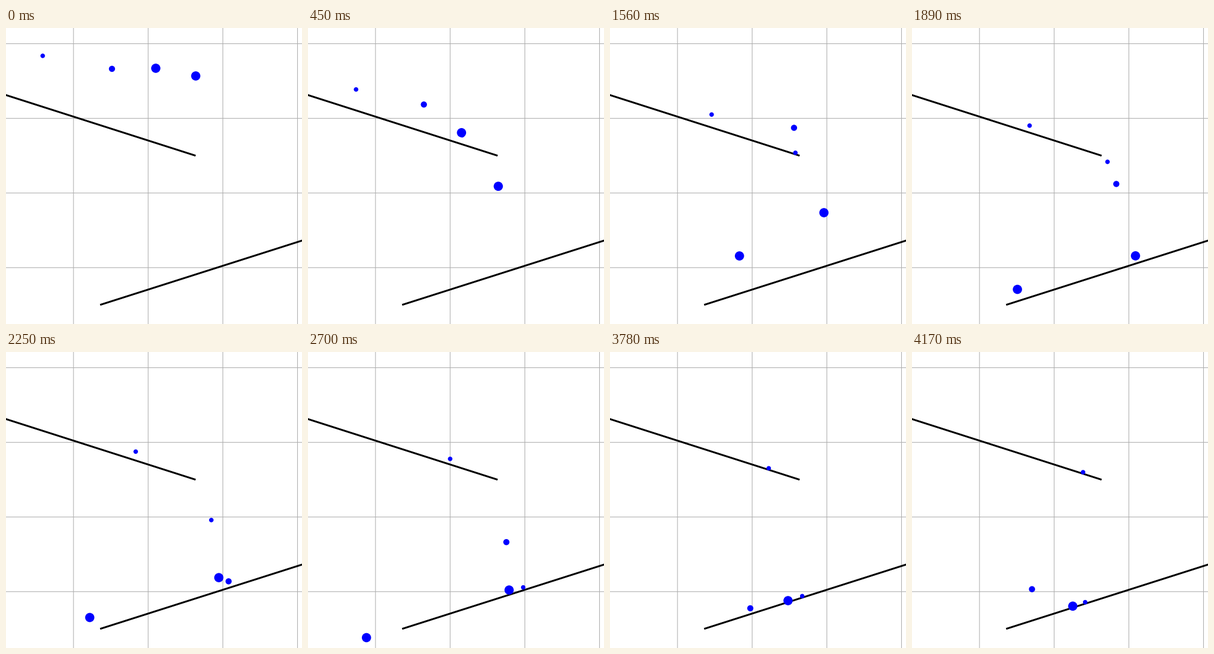
These frames come from a looping animation (500x500 px, 4.2 s). A matplotlib script:

```python
import numpy as np
import matplotlib.pyplot as plt
from matplotlib.animation import FuncAnimation

SIZE, DPI = 500, 100
FRAMES, STEP = 140, 30          # 4200 ms per loop
G = 350                         # gravity, px/s^2
SLOPE = 0.319
SLIDE = G * SLOPE / (1 + SLOPE ** 2)
GAP = 2.1                       # height of a resting ball above its ramp
FLY, ROLL = 0, 1


def upper(t, x, kind=FLY):
    """Touch point on the upper ramp, and how the ball leaves it."""
    return t, x, 113 + SLOPE * x - GAP, kind, SLIDE


def lower(t, x, kind=FLY):
    return t, x, 467 - SLOPE * (x - 160) - GAP, kind, -SLIDE


def free(t, x, y):
    return t, x, y, FLY, 0


# Radius and touch points (time in s, position in px) of each ball.
BALLS = [
    (3.8, [free(0, 62, 47), upper(0.227, 63), upper(1.295, 150),
           upper(1.98, 206), upper(2.515, 232), upper(2.915, 249.5),
           upper(3.215, 257), upper(3.45, 262.5, ROLL), upper(4.2, 291.2)]),
    (3.8, [free(0, 253, 68), upper(0.31, 252), upper(0.98, 293.5, ROLL),
           upper(1.646, 319), lower(2.645, 365), lower(2.945, 357, ROLL),
           lower(3.39, 341.5, ROLL), lower(4.2, 289.4)]),
    (5.2, [free(0, 179, 69), upper(0.255, 175.5), lower(2.217, 379),
           lower(3.74, 240.5), lower(4.843, 143.5)]),
    (7.8, [free(0, 253, 68), upper(0.316, 247), lower(1.79, 382.5),
           lower(2.5, 347), lower(2.857, 334), lower(3.05, 326, ROLL),
           lower(3.39, 314.5, ROLL), lower(4.2, 268.7)]),
    (7.8, [free(0, 320.5, 81), lower(0.72, 322), lower(1.976, 167.5),
           free(2.95, 75, 532)]),
]


def position(path, t):
    """Constant-acceleration motion between two neighbouring touch points."""
    if t >= path[-1][0]:
        return path[-1][1:3]
    i = max(k for k, p in enumerate(path) if p[0] <= t)
    t0, x0, y0, kind, pull = path[i]
    t1, x1, y1 = path[i + 1][:3]
    acc_x, acc_y = (pull, abs(pull) * SLOPE) if kind == ROLL else (0, G)
    u = (t - t0) / (t1 - t0)
    sag = 0.5 * (t - t0) * (t1 - t)
    return x0 + (x1 - x0) * u - acc_x * sag, y0 + (y1 - y0) * u - acc_y * sag


fig = plt.figure(figsize=(SIZE / DPI, SIZE / DPI), dpi=DPI, facecolor="white")
ax = fig.add_axes([0, 0, 1, 1])
ax.set_xlim(0, SIZE)
ax.set_ylim(SIZE, 0)
ax.axis("off")

grid = dict(color="#b0b0b0", lw=0.8, zorder=1, snap=False)
for k in range(4):
    ax.axvline(114 + 126.15 * k, **grid)
    ax.axhline(26.5 + 126.1 * k, **grid)

ax.plot([-5, 318.8], [111.7, 215.2], color="black", lw=2.2, zorder=2)
ax.plot([160.5, 505], [467.2, 357.5], color="black", lw=2.2, zorder=2)

areas = [(2 * r * 72 / DPI) ** 2 for r, _ in BALLS]
dots = ax.scatter(np.zeros(len(BALLS)), np.zeros(len(BALLS)), s=areas,
                  color="blue", linewidths=0, zorder=3)


def update(frame):
    t = frame * STEP / 1000
    dots.set_offsets([position(path, t) for _, path in BALLS])
    return dots,


anim = FuncAnimation(fig, update, frames=FRAMES, interval=STEP,
                     repeat=True, repeat_delay=0, blit=False)
plt.show()
```
